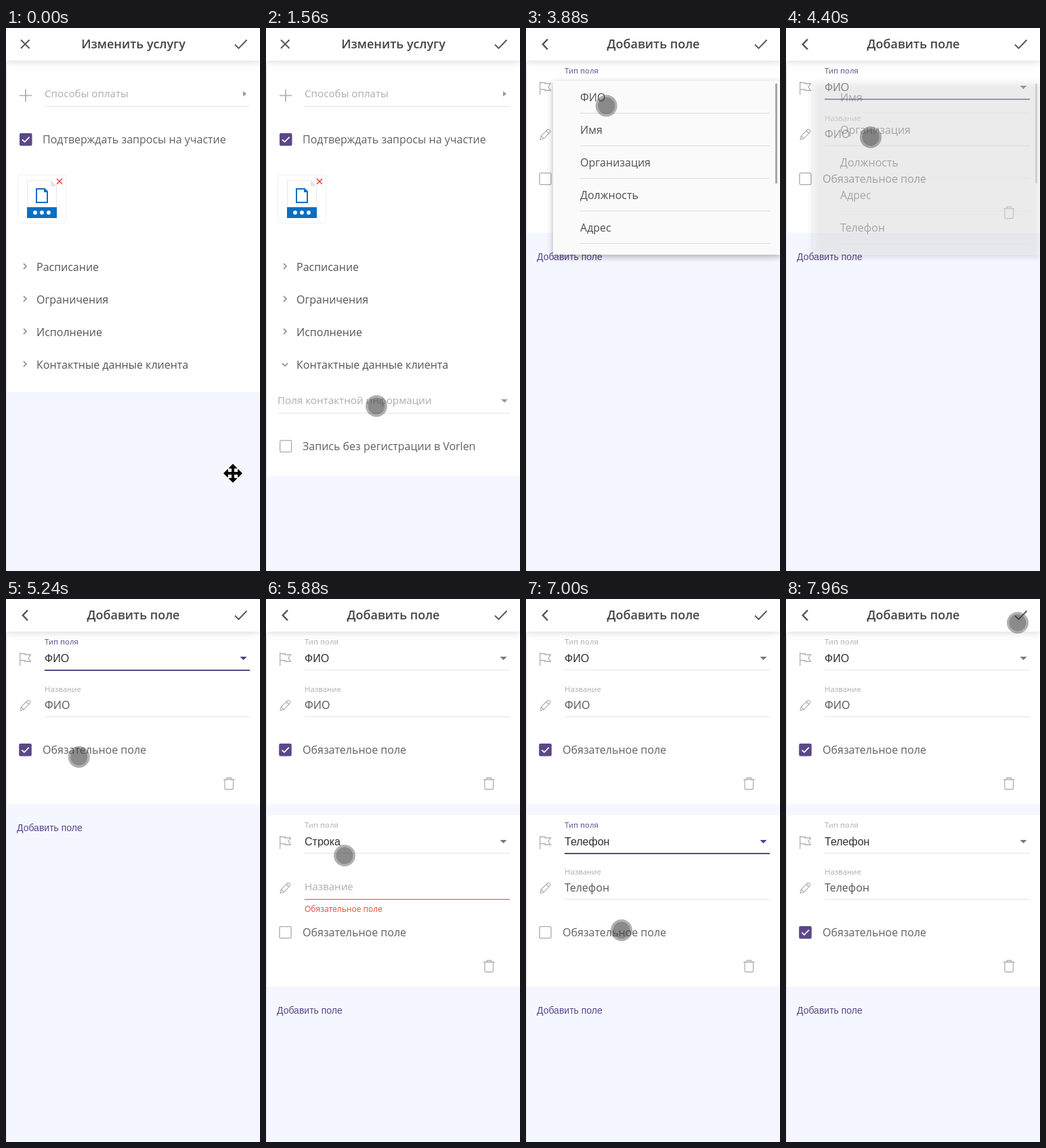
Recreate the animation shown at these times as an HTML page with a canvas. Size 375 by 800 pixels, loop 8000 ms.

```html
<!DOCTYPE html>
<html lang="ru">
<head>
<meta charset="utf-8">
<style>
  html, body { margin: 0; width: 100%; height: 100%; overflow: hidden; background: #f4f7ff; }
  canvas { display: block; }
</style>
</head>
<body>
<canvas id="stage" width="375" height="800"></canvas>
<script>
const ctx = document.getElementById('stage').getContext('2d');
const LOOP = 8000;
const SANS = '"Open Sans", sans-serif', ARIAL = '"Liberation Sans", Arial, sans-serif';
const BG = '#f4f7ff', PURPLE = '#5b4789', RED = '#f44336', RULE = '#e5e5e5';
const INK = '#555', HINT = '#adadad', ICON = '#b0b0b0';
const OPTIONS = ['ФИО', 'Имя', 'Организация', 'Должность', 'Адрес', 'Телефон'];

// Pointer path: time, x, y
const POINTER = [
  [120, 335, 656], [320, 173, 526], [480, 173, 526], [620, 180, 577], [840, 160, 501],
  [1240, 160, 501], [1560, 163, 557], [2360, 163, 557], [2680, 76, 58], [2880, 82, 84],
  [3040, 83, 86], [3400, 83, 86], [3760, 118, 122], [4080, 120, 99], [4240, 120, 99],
  [4400, 125, 161], [4640, 112, 222], [4880, 110, 224], [5200, 110, 224], [5440, 80, 337],
  [5600, 80, 338], [5880, 116, 378], [6000, 118, 362], [6180, 118, 362], [6460, 142, 562],
  [6600, 142, 562], [6840, 140, 497], [7000, 141, 488], [7320, 141, 490],
  [7680, 296, 191], [7960, 342, 35]
];

const ramp = (t, from, to) => Math.min(1, Math.max(0, (t - from) / (to - from)));
const smooth = p => p * p * (3 - 2 * p);
const easeOut = p => 1 - (1 - p) ** 3;

function rect(x, y, w, h, color) {
  ctx.fillStyle = color;
  ctx.fillRect(x, y, w, h);
}

function text(str, x, y, size, color, { font = SANS, weight = 400, align = 'left' } = {}) {
  ctx.font = `${weight} ${size}px ${font}`;
  ctx.textAlign = align;
  ctx.fillStyle = color;
  ctx.fillText(str, x, y);
}

function stroke(d, color, width) {
  ctx.strokeStyle = color;
  ctx.lineWidth = width;
  ctx.stroke(new Path2D(d));
}

function fill(d, color) {
  ctx.fillStyle = color;
  ctx.fill(new Path2D(d));
}

function at(x, y, draw) {
  ctx.save();
  ctx.translate(x, y);
  draw();
  ctx.restore();
}

function disc(x, y, r, color) {
  ctx.beginPath();
  ctx.arc(x, y, r, 0, 7);
  ctx.fillStyle = color;
  ctx.fill();
}

function box(x, y, w, h, r) {
  ctx.beginPath();
  ctx.roundRect(x, y, w, h, r);
}

function withShadow(color, blur, dy, draw) {
  ctx.save();
  ctx.shadowColor = color;
  ctx.shadowBlur = blur;
  ctx.shadowOffsetY = dy;
  draw();
  ctx.restore();
}

function header(title, icon, width) {
  withShadow('rgba(0,0,0,.14)', 10, 2, () => rect(0, 0, 375, 48, '#fff'));
  text(title, 188, 30, 18, '#444', { weight: 600, align: 'center' });
  stroke(icon, INK, width);
  stroke('M338 24.5L343.5 30L355.5 17.5', INK, 1.9);
}

function checkbox(x, y, label, checked) {
  at(x, y, () => {
    box(.7, .7, 17, 17, 1.5);
    ctx.strokeStyle = '#aaa';
    ctx.lineWidth = 1.3;
    ctx.stroke();
    ctx.save();
    ctx.globalAlpha *= checked;
    box(0, 0, 18.4, 18.4, 2);
    ctx.fillStyle = PURPLE;
    ctx.fill();
    stroke('M4 9.3L7.6 12.9L14.6 5.6', '#fff', 1.7);
    ctx.restore();
  });
  text(label, 54, y + 14.5, 16, '#616161');
}

function attachment() {
  box(17.5, 216.5, 71, 71, 4);
  ctx.strokeStyle = '#f0f0f0';
  ctx.lineWidth = 1;
  ctx.stroke();
  stroke('M31.5 264V224.5H66L74.5 233V264', '#e8e8e8', 1);
  fill('M66 224.5V233H74.5Z', '#e4e4e4');
  stroke('M45 237H57L61 241V257H45ZM57 237V241H61', '#0a6fc2', 2);
  rect(31, 264, 44, 16, '#0a6fc2');
  for (const x of [43, 53, 63]) disc(x, 272, 2.9, '#fff');
  stroke('M75 222L83 230M83 222L75 230', '#e53935', 1.4);
}

function serviceScreen(t) {
  const open = easeOut(ramp(t, 1120, 1360));
  const bottom = 536 + 124 * open;
  rect(0, 48, 375, bottom - 48, '#fff');
  stroke('M20 99.5H38M29 90.5V108.5', '#aaa', 1.6);
  text('Способы оплаты', 57, 102, 15.2, HINT);
  fill('M350 93L355 97L350 101Z', '#999');
  rect(57, 115, 303, 1, RULE);
  checkbox(20, 155, 'Подтверждать запросы на участие', 1);
  attachment();
  ['Расписание', 'Ограничения', 'Исполнение', 'Контактные данные клиента'].forEach((name, i) => {
    const y = 351 + 48 * i;
    at(28, y + (i === 3 ? open : 0), () => {
      if (i === 3) ctx.rotate(open * Math.PI / 2);
      stroke('M-2 -4L2 0L-2 4', '#999', 1.8);
    });
    text(name, 45, y + 7, 16, INK);
  });
  if (open) {
    ctx.save();
    ctx.beginPath();
    ctx.rect(0, 512, 375, bottom - 512);
    ctx.clip();
    ctx.globalAlpha = open;
    text('Поля контактной информации', 17, 554, 15.2, HINT);
    fill('M347 547H357L352 552Z', '#999');
    rect(17, 567, 343, 1, RULE);
    checkbox(20, 607, 'Запись без регистрации в Vorlen', 0);
    ctx.restore();
  }
  header('Изменить услугу', 'M22 17.5L34.5 30M34.5 17.5L22 30', 1.9);
}

// Times of the events in each field card
const CARDS = [
  { top: 0, low: 0, shown: 2960, invalid: 3050, focus: 3320, pick: 4320, check: 4720, blur: 5480, value: 'ФИО' },
  { top: 270, low: 269, shown: 5560, invalid: 5650, focus: 6080, pick: 6560, check: 7200, blur: 7200, value: 'Телефон' }
];

function fieldCard(t, c) {
  const picked = t >= c.pick;
  const focused = t >= c.focus && t < c.blur;
  rect(0, 48 + c.top, 375, 254 + c.low - c.top, '#fff');
  at(0, c.top, () => {
    text('Тип поля', 57, 67, 11.4, focused ? PURPLE : HINT);
    stroke('M20.7 79V98.5M20.7 80.5H28V82H36.5L33 87L36.5 92H28V90.5H20.7', ICON, 1.3);
    text(picked ? c.value : 'Строка', 57, 93, 16, '#303030', { font: ARIAL });
    fill('M345.5 85H355.5L350.5 90Z', focused ? '#4a3f9a' : '#777');
    rect(57, 104, 303, focused ? 2 : 1, focused ? PURPLE : RULE);
  });
  at(0, c.low, () => {
    stroke('M21 164.5L22.3 159L32 149.5Q33 148.7 34 149.5L35.7 151.2Q36.5 152.2 35.7 153.2L26.2 163ZM30 151.5L33.8 155.2M22.3 159L26.2 163', ICON, 1.2);
    if (picked) {
      text('Название', 57, 137, 11.4, HINT);
      text(c.value, 57, 162, 16, INK);
      rect(57, 173, 303, 1, RULE);
    } else {
      text('Название', 57, 160, 15.2, HINT);
      text('Обязательное поле', 57, 192, 12, RED);
      rect(57, 173, 303, 1, t < c.invalid ? '#777' : RED);
    }
    checkbox(19.3, 213, 'Обязательное поле', ramp(t, c.check, c.check + 100));
    stroke('M321 266H337.5M326 266V263.5H332.5V266M323 266V278.5Q323 280.5 325 280.5H333.5Q335.5 280.5 335.5 278.5V266', ICON, 1.3);
  });
}

function optionPanel(t, c, used) {
  const open = ramp(t, c.focus, c.focus + 120);
  const alpha = open * (1 - ramp(t, c.pick + 20, c.pick + 130));
  if (!alpha) return;
  const hidden = t >= c.pick ? [...used, c.value] : used;
  ctx.save();
  ctx.globalAlpha = alpha;
  ctx.translate(40, 78 + c.top - (c.top && 1));
  ctx.scale(1, .8 + .2 * easeOut(open));
  withShadow('rgba(0,0,0,.3)', 9, 3, () => rect(0, 0, 335, 256, '#fafafa'));
  OPTIONS.filter(o => !hidden.includes(o)).slice(0, 5).forEach((name, i) => {
    text(name, 40, 30 + 48 * i, 16, '#505050');
    rect(40, 47 + 48 * i, 280, 1, '#dcdcdc');
  });
  rect(328, 4, 3, 147, '#a8a8a8');
  ctx.restore();
}

function fieldsScreen(t) {
  const cards = CARDS.filter(c => t >= c.shown);
  cards.forEach(c => fieldCard(t, c));
  text('Добавить поле', 16, [88, 342, 611][cards.length], 14, PURPLE, { font: ARIAL });
  cards.forEach((c, i) => optionPanel(t, c, cards.slice(0, i).map(p => p.value)));
  header('Добавить поле', 'M32 16.5L24.8 24L32 31.5', 2.5);
}

function moveCursor() {
  const arrow = 'M0 -14L6 -8V-7H2V2H-2V-7H-6V-8Z';
  for (const paint of [() => stroke(arrow, '#fff', 2), () => fill(arrow, '#000')]) {
    for (let i = 0; i < 4; i++) {
      paint();
      ctx.rotate(Math.PI / 2);
    }
  }
}

function pointer(t) {
  const next = POINTER.findIndex(p => p[0] > t);
  const [t1, x1, y1] = POINTER.at(next < 0 ? -1 : next);
  const [t0, x0, y0] = POINTER.at(next < 0 ? -1 : Math.max(0, next - 1));
  const p = t1 > t0 ? smooth(ramp(t, t0, t1)) : 0;
  at(x0 + (x1 - x0) * p, y0 + (y1 - y0) * p, () => {
    if (t < 140) return moveCursor();
    disc(0, 0, 16, 'rgba(60,60,60,.4)');
    disc(0, 0, 12.5, 'rgba(60,60,60,.32)');
  });
}

function render(t) {
  rect(0, 0, 375, 800, BG);
  (t < 2040 ? serviceScreen : fieldsScreen)(t);
  rect(0, 50, 1, 750, '#e2e3e8');
  pointer(t);
}

const start = performance.now();
function tick() {
  render((performance.now() - start) % LOOP);
  requestAnimationFrame(tick);
}
tick();
</script>
</body>
</html>
```
